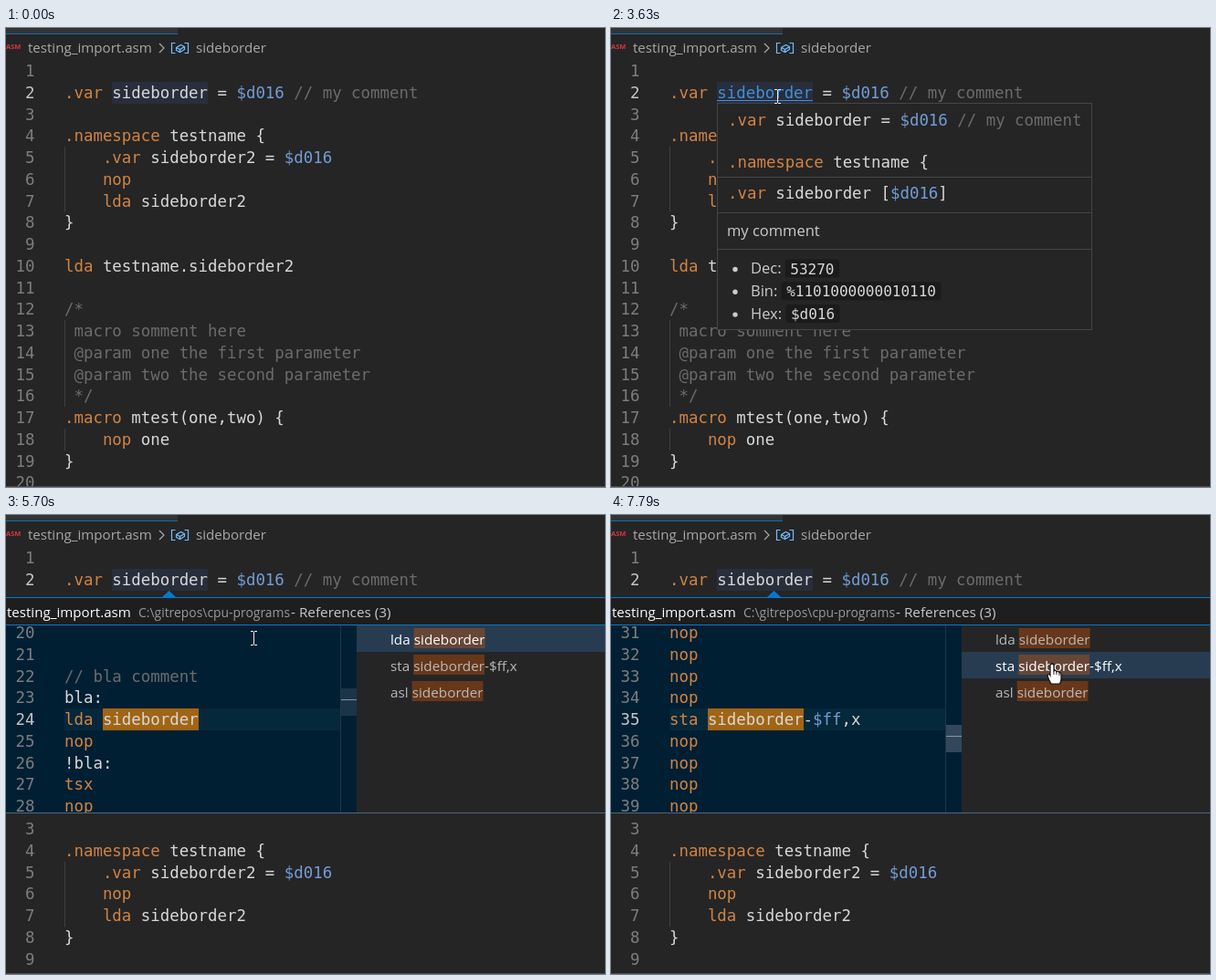
Animation of 656x503 px, one loop 8 s. Source, as an HTML page with a canvas:

```html
<!DOCTYPE html>
<html lang="en">
<head>
<meta charset="utf-8">
<title>Editor references</title>
<style>
  html, body { margin: 0; width: 100%; height: 100%; overflow: hidden; background: #252526; }
  canvas { display: block; }
</style>
</head>
<body>
<canvas id="stage" width="656" height="503"></canvas>
<script>
const ctx = document.getElementById('stage').getContext('2d');
const LOOP = 8000, PITCH = 23.75, CODE_X = 64;
const BG = '#252526', BLUE = '#007acc', WORD = '#292e3c';
const PLAIN = '#d8d8d8', KEYWORD = '#d18442', NUMBER = '#729dd3', COMMENT = '#6b6b6b';
const mono = size => `${size}px "DejaVu Sans Mono", monospace`;
const sans = size => `${size}px "Open Sans", sans-serif`;
const CODE = mono(17.4), UI = sans(15.1), LIST = sans(15.3);

const source = `
.var sideborder = $d016 // my comment

.namespace testname {
    .var sideborder2 = $d016
    nop
    lda sideborder2
}

lda testname.sideborder2

/*
 macro somment here
 @param one the first parameter
 @param two the second parameter
 */
.macro mtest(one,two) {
    nop one
}
`.split('\n');

const previews = [
  { first: 20, top: 190, lines: ['', '', '// bla comment', 'bla:', 'lda sideborder', 'nop', '!bla:', 'tsx', 'nop'] },
  { first: 31, top: 230, lines: ['nop', 'nop', 'nop', 'nop', 'sta sideborder-$ff,x', 'nop', 'nop', 'nop', 'nop'] },
  { first: 40, top: 262, lines: ['nop', 'nop', 'nop', 'nop', 'asl sideborder', '', '', '', ''] }
];
const references = [['lda ', ''], ['sta ', '-$ff,x'], ['asl ', '']];

// Cursor positions: time, x, y
const track = [
  [440, 450, 516], [1260, 244, 162], [1740, 186, 75], [2050, 186, 75], [2110, 185, 73],
  [3170, 185, 73], [3230, 182, 75], [4470, 182, 75], [4530, 182, 71], [5440, 182, 71],
  [5700, 271, 135], [6250, 457, 234], [6370, 453, 214], [6450, 492, 203], [6550, 472, 194],
  [7190, 472, 194], [7550, 483, 163], [LOOP, 483, 163]
];

function rect(x, y, w, h, color) {
  ctx.fillStyle = color;
  ctx.fillRect(x, y, w, h);
}

function text(str, x, y, color, font) {
  ctx.font = font;
  ctx.fillStyle = color;
  ctx.fillText(str, x, y);
  return x + ctx.measureText(str).width;
}

function shape(path, x, y, fill, stroke) {
  const p = new Path2D(path);
  ctx.save();
  ctx.translate(x, y);
  if (fill) { ctx.fillStyle = fill; ctx.fill(p); }
  if (stroke) { ctx.strokeStyle = stroke; ctx.lineWidth = 1.2; ctx.stroke(p); }
  ctx.restore();
}

function code(line, x, centre) {
  const token = /\/\/.*|(?<!\w)\.\w+|\b(?:nop|lda|sta|asl|tsx)\b|\$\w+|[^.$\/\w]+|\w+|./g;
  const isComment = /^( \S|\/\*)/.test(line);
  const parts = isComment ? [line] : line.match(token) || [];
  for (const part of parts) {
    const color = isComment || part.startsWith('//') ? COMMENT
      : /^(\.\w|(nop|lda|sta|asl|tsx)$)/.test(part) ? KEYWORD
      : /^\$/.test(part) ? NUMBER : PLAIN;
    x = text(part, x, Math.round(centre + 6), color, CODE);
  }
}

function numberedLine(number, line, centre, active) {
  const label = String(number);
  ctx.font = CODE;
  text(label, 31.5 - ctx.measureText(label).width, Math.round(centre + 6), active ? '#c6c6c6' : '#7d7d7d', CODE);
  code(line, CODE_X, centre);
}

function sourceLines(from, to, shift) {
  const guide = (a, b) => {
    if (a >= from && b <= to) rect(64, Math.round(35 + PITCH * (a - 1) + shift), 1, PITCH * (b - a + 1), '#404040');
  };
  guide(5, 7); guide(13, 16); guide(18, 18);
  for (let n = from; n <= to; n++) numberedLine(n, source[n - 1], 47 + PITCH * (n - 1) + shift, n === 2);
}

function header() {
  rect(0, 0, 188, 6, '#333435');
  rect(0, 6, 188, 1, '#0b6fb3');
  text('ASM', 0, 23, '#d3383d', 'bold ' + sans(7.5));
  text('testing_import.asm', 24, 27, '#a9a9a9', UI);
  shape('M0 0L5 5L0 10', 168, 17, null, '#a9a9a9');
  shape('M4 0H0V11H4M14 0H18V11H14M5 5L10 2L14 4V7L9 10L5 8ZM5 5L9 7L14 4M9 7V10', 181.5, 16.5, null, '#75beff');
  text('sideborder', 208, 27, '#a9a9a9', UI);
}

function popup(full) {
  const right = full ? 527 : 366, shift = full ? 0 : -80;
  const rule = y => rect(117, y + shift, right - 118, 1, '#454545');
  rect(116, 82, right - 116, 249 + shift, '#454545');
  rect(117, 83, right - 118, 247 + shift, BG);
  if (full) {
    code(source[1], 128, 101);
    code(source[3], 128, 147);
    rule(163);
  }
  code('.var sideborder [$d016]', 128, 181 + shift);
  rule(202);
  text('my comment', 127, 228 + shift, '#cccccc', sans(16.5));
  rule(242);
  [['Dec:', '53270'], ['Bin:', '%1101000000010110'], ['Hex:', '$d016']].forEach(([label, value], i) => {
    const y = 263.5 + 24.8 * i + shift;
    ctx.beginPath();
    ctx.arc(136, y + 1, 2.7, 0, 7);
    ctx.fillStyle = '#cccccc';
    ctx.fill();
    const x = text(label + ' ', 153, Math.round(y + 5.5), '#cccccc', sans(16.5));
    ctx.font = mono(16);
    ctx.beginPath();
    ctx.roundRect(x, y - 10, ctx.measureText(value).width + 11, 20, 3);
    ctx.fillStyle = '#1b1b1b';
    ctx.fill();
    text(value, x + 5.5, Math.round(y + 6), PLAIN, mono(16));
  });
}

function peek(selected, sliderOn) {
  const view = previews[selected];
  shape('M0 7L7.5 0L15 7Z', 171, 83, BLUE);
  rect(0, 90, 656, 237, BG);
  rect(0, 91, 656, 29, '#1e1e1e');
  rect(0, 90, 656, 1, BLUE);
  text('testing_import.asm', 1, 112, '#ffffff', UI);
  text('C:\\gitrepos\\cpu-programs', 145, 112, '#9a9a9a', sans(13.9));
  text('- References (3)', 312, 112, '#c8c8c8', LIST);

  ctx.save();
  ctx.beginPath();
  ctx.rect(0, 121, 384, 205);
  ctx.clip();
  rect(0, 121, 384, 205, '#001f33');
  rect(64, 212, 302, 24, '#05283a');
  rect(106, 212, 105, 24, '#a06515');
  view.lines.forEach((line, i) => numberedLine(view.first + i, line, 129.2 + PITCH * i, i === 4));
  rect(366, 121, 1, 205, '#1d3748');
  rect(367, view.top, 17, 30, sliderOn ? '#32485a' : '#1b3548');
  rect(367, view.top + 12, 17, 1, '#8c959c');
  ctx.restore();

  references.forEach(([before, after], i) => {
    const y = 121 + 29 * i, on = i === selected;
    const color = on ? '#ffffff' : '#b9b9b9';
    if (on) rect(384, y, 272, 29, '#273c51');
    const x = text(before, 421, y + 21, color, LIST);
    const end = x + ctx.measureText('sideborder').width;
    rect(x, y + 3, end - x, 22, 'rgba(234,92,0,.33)');
    text('sideborder', x, y + 21, color, LIST);
    text(after, end, y + 21, color, LIST);
  });
  rect(0, 120, 656, 1, BLUE);
  rect(0, 326, 656, 1, '#4a6a84');
}

function cursor(t) {
  if (t < 500) return;
  const i = track.findIndex(key => key[0] > t);
  const [t0, x0, y0] = track[i - 1], [t1, x1, y1] = track[i];
  const k = (t - t0) / (t1 - t0);
  const x = Math.round(x0 + (x1 - x0) * k), y = Math.round(y0 + (y1 - y0) * k);
  const overLink = t >= 4050 && t < 4530, overList = x > 384 && t > 5490;
  if (overLink || overList && y < 209) {
    const tip = overLink ? 72 : y;
    shape('M-2 1Q0-1 2 1V8Q4 6 5 9Q7 7 8 10Q10 9 10 12V17Q10 20 8 22H-1Q-4 17-5 13Q-4 10-2 13Z',
      x, tip, '#ffffff', '#111111');
    shape('M2 8V12M5 9V12M8 10V13', x, tip, null, '#555555');
  } else if (overList) {
    shape('M0 0V16L4 12L7 19L9 18L6 11H12Z', x, y, '#ffffff', '#111111');
  } else {
    rect(x, y - 7, 1, 14, '#f0f0f0');
    for (const edge of [-8, 7]) {
      rect(x - 3, y + edge, 3, 1, '#f0f0f0');
      rect(x + 1, y + edge, 3, 1, '#f0f0f0');
    }
  }
}

function draw(t) {
  const peeking = t >= 4670, linked = t >= 3230 && t < 4530;
  rect(0, 0, 656, 503, BG);
  header();
  if (t < 4530 || peeking) rect(116, 59, 105, 24, WORD);
  if (peeking) {
    sourceLines(1, 2, 0);
    sourceLines(3, 9, 249.5);
    peek(t < 6790 ? 0 : t < 7790 ? 2 : 1, t < 5350 || t >= 6790);
  } else {
    sourceLines(1, 20, 0);
  }
  if (linked) {
    rect(116, 60, 105, 22, WORD);
    ctx.font = CODE;
    text('sideborder', CODE_X + ctx.measureText('.var ').width, 77, '#3f8fdc', CODE);
    rect(116, 79, 105, 1, '#3f8fdc');
  }
  if (t >= 2050 && t < 4530) {
    ctx.globalAlpha = t < 2110 ? 0.6 : 1;
    popup(t >= 3630);
    ctx.globalAlpha = 1;
  }
  rect(0, 502, 656, 1, '#4a4a4a');
  cursor(t);
}

function frame() {
  draw(performance.now() % LOOP);
  requestAnimationFrame(frame);
}
frame();
</script>
</body>
</html>
```
